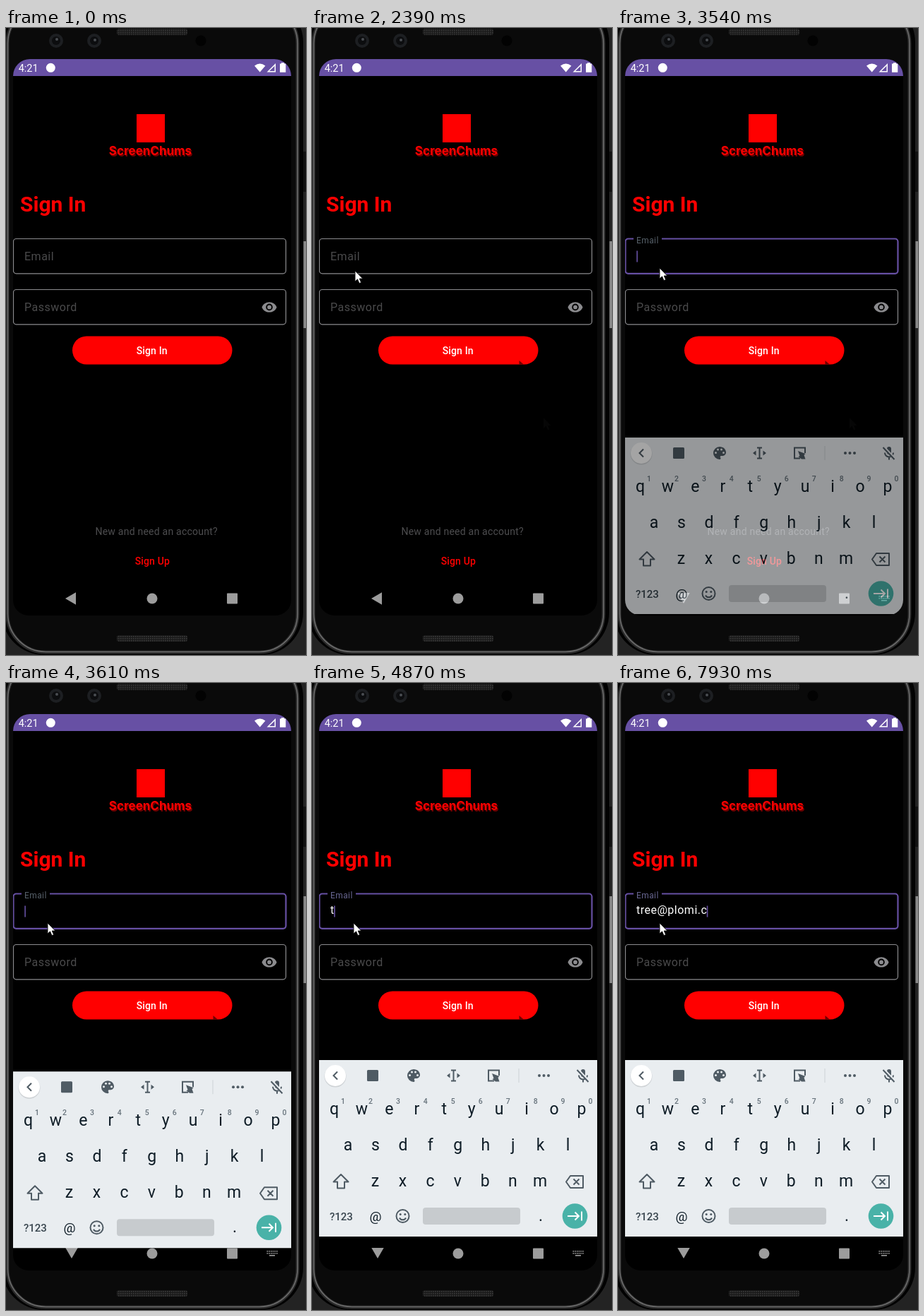
An HTML page that plays this animation: 425 by 888 pixels, repeating every 8 s.

```html
<!DOCTYPE html>
<html lang="en">
<head>
<meta charset="utf-8">
<title>Sign in</title>
<style>
  html, body { margin: 0; width: 100%; height: 100%; overflow: hidden; background: #000; }
  svg { display: block; width: 100%; height: 100%; }
  text { font-family: Roboto, sans-serif; white-space: pre; }
  .mid { text-anchor: middle; }
  .field { fill: none; stroke: #8b8b8e; stroke-width: 1.2; }
  .hint { font-size: 16px; letter-spacing: .5px; fill: #4a4a4b; }
  .icon { fill: #4f5b64; }
  .line { fill: none; stroke: #4f5b64; stroke-width: 2; }
  .key { font-size: 23px; fill: #0e1c26; text-anchor: middle; }
  .digit { font-size: 10.5px; fill: #66727b; text-anchor: middle; font-weight: 500; }
</style>
</head>
<body>
<svg viewBox="0 0 425 888" preserveAspectRatio="none">
  <defs>
    <clipPath id="screen"><path d="M10 68a24 24 0 0 1 24-24H380a24 24 0 0 1 24 24V810a22 22 0 0 1-22 22H32a22 22 0 0 1-22-22z"/></clipPath>
    <pattern id="mesh" width="3" height="3" patternUnits="userSpaceOnUse">
      <rect width="3" height="3" fill="#191919"/><rect width="1.6" height="1.6" fill="#3c3c3c"/>
    </pattern>
    <path id="arrow" d="M0 0V15L3.5 11.8 6 17.6 8.6 16.4 6.2 11H10.8z"/>
  </defs>

  <!-- phone body -->
  <rect width="425" height="888" fill="#232323"/>
  <rect x="421" y="175" width="4" height="57" fill="#101010"/>
  <rect x="421.500" y="302" width="3.500" height="123" fill="#8a8a8a"/>
  <rect x="-6" y="-40" width="427" height="928" rx="60" fill="#020202"/>
  <rect x="2" y="-32" width="411" height="916" rx="54" fill="#0a0a0a" stroke="#2a2a2a" stroke-width="5"/>
  <rect x="2.500" y="-32" width="410.500" height="915.500" rx="54" fill="none" stroke="#6c6c6c" stroke-width="1.600"/>
  <rect x="157" y="1" width="100" height="9" rx="3" fill="url(#mesh)"/>
  <rect x="157" y="860" width="100" height="9" rx="3" fill="url(#mesh)"/>
  <g id="lenses"></g>
  <circle cx="276" cy="18" r="7.500" fill="#020202"/>

  <g clip-path="url(#screen)">
    <rect x="10" y="44" width="394" height="788" fill="#000"/>
    <rect x="10" y="44" width="394" height="24" fill="#6750a4"/>
    <g fill="#fff">
      <text x="17.700" y="62" font-size="14.500">4:21</text>
      <circle cx="63.300" cy="56.300" r="6.500"/>
      <path d="M352 53.500Q359.700 47.500 367.400 53.500L359.700 62.500z"/>
      <path d="M382 50V62.500H369.500zM380.500 53.700L373 61H380.500z" fill-rule="evenodd"/>
      <path d="M390 50.500V49.300H394V50.500H396.300V62.800H388V50.500z"/>
    </g>

    <rect x="185" y="122" width="40" height="40" fill="#f00"/>
    <g class="mid" font-size="17" font-weight="700">
      <text x="206" y="181.500" fill="#700000" style="font-family:Inter,sans-serif">ScreenChums</text>
      <text x="204.500" y="180" fill="#f00" style="font-family:Inter,sans-serif">ScreenChums</text>
    </g>
    <text x="20" y="260" font-size="30" font-weight="700" fill="#f00">Sign In</text>

    <rect id="box" class="field" x="10.500" y="298.500" width="386" height="49.300" rx="4"/>
    <rect id="gap" x="22" y="296" width="0" height="5" fill="#000"/>
    <text id="label" class="hint">Email</text>
    <text id="typed" x="26" y="327" font-size="16" letter-spacing=".5" fill="#fff"></text>
    <rect id="caret" y="315.500" width="1.600" height="16" fill="#6750a4"/>

    <rect class="field" x="10.500" y="370.500" width="386" height="49.300" rx="4"/>
    <text class="hint" x="26" y="401">Password</text>
    <path transform="translate(361.500 383.900) scale(.96)" fill="#8b8b8e" d="M12 4.500C7 4.500 2.730 7.610 1 12c1.730 4.390 6 7.500 11 7.500s9.270-3.110 11-7.500c-1.730-4.390-6-7.500-11-7.500zM12 17a5 5 0 1 1 0-10 5 5 0 0 1 0 10zm0-8a3 3 0 1 0 0 6 3 3 0 0 0 0-6z"/>

    <rect x="94" y="436.500" width="226.500" height="40" rx="20" fill="#f00"/>
    <text x="184.700" y="462" font-size="14" font-weight="500" letter-spacing=".15" fill="#fff">Sign In</text>
    <g id="trail">
      <path d="M293.500 471L300.500 477H293.500z" fill="#700000"/>
      <use href="#arrow" x="328" y="552" fill="#060606"/>
    </g>
    <text x="126.500" y="717.500" font-size="14" letter-spacing=".23" fill="#4d4d4f">New and need an account?</text>
    <text x="182.700" y="760" font-size="14" font-weight="500" letter-spacing=".15" fill="#f00">Sign Up</text>

    <g fill="#9c9c9c">
      <path id="back" d="M-9 0L6-8.700V8.700z"/>
      <circle cx="207" cy="808" r="7.500"/>
      <rect x="313" y="800.500" width="15" height="15" rx="1"/>
      <g id="dots"></g>
    </g>

    <g id="board">
      <rect x="10" y="534" width="394" height="250" fill="#e9edf0"/>
      <circle cx="33" cy="557" r="15.500" fill="#cfd3d6"/>
      <circle cx="33" cy="556" r="15" fill="#fff"/>
      <path id="chevron" class="line" d="M3-5.500L-2.500 0 3 5.500"/>
      <g id="tools">
        <rect class="icon" x="78" y="548" width="16" height="16" rx="1.500"/>
        <path class="icon" transform="translate(132 544)" d="M12 3a9 9 0 0 0 0 18c.83 0 1.500-.67 1.500-1.500 0-.39-.15-.74-.39-1-.23-.26-.38-.61-.38-1 0-.83.67-1.500 1.500-1.500H16c2.760 0 5-2.240 5-5 0-4.420-4.030-8-9-8z"/>
        <g fill="#e9edf0">
          <circle cx="138.500" cy="555.500" r="1.500"/><circle cx="141.500" cy="551" r="1.500"/>
          <circle cx="146.500" cy="551" r="1.500"/><circle cx="149.500" cy="555.500" r="1.500"/>
        </g>
        <path class="line" d="M197 548.500H204M200.500 548.500V563.500M197 563.500H204"/>
        <path class="icon" d="M191 556l4.500-3.500v7zM210 556l-4.500-3.500v7z"/>
        <path class="line" d="M258 563.500H250V548.500H265V556"/>
        <path class="icon" d="M255 553l10.500 4-2 1.800 2 5.700h-5.500l-4.500-3.500 2-1z"/>
        <path d="M293 546V566" stroke="#cdd2d6"/>
        <g class="icon"><circle cx="322" cy="556" r="2"/><circle cx="328.500" cy="556" r="2"/><circle cx="335" cy="556" r="2"/></g>
      </g>
      <text id="hintWord" class="mid" x="98" y="561" font-size="15" fill="#0e1c26"></text>
      <rect class="icon" x="381" y="547" width="6" height="11" rx="3"/>
      <path class="line" d="M378 555.500a6 6 0 0 0 12 0M384 561.500V565.500"/>
      <path d="M376 547L392 564" stroke="#e9edf0" stroke-width="4"/>
      <path class="line" d="M375.500 548L391.500 565"/>
      <g id="keys"></g>
      <path class="line" stroke-linejoin="round" d="M41 696L30.500 706.500H36V715.500H46V706.500H51.500z"/>
      <path class="line" stroke-linejoin="round" d="M360 706.500L366 698H384V715H366zM370.500 702.500l8 8m0-8l-8 8"/>
      <text x="25" y="760.500" font-size="15" font-weight="500" fill="#38454e">?123</text>
      <text class="key" x="90" y="762" style="font-size:19px">@</text>
      <circle class="line" cx="128.500" cy="755" r="9"/>
      <g class="icon"><circle cx="125.200" cy="752.500" r="1.500"/><circle cx="131.800" cy="752.500" r="1.500"/></g>
      <path class="line" d="M124 757.500a5 5 0 0 0 9 0"/>
      <rect x="157" y="743" width="138" height="24" rx="4" fill="#c7cbce"/>
      <text class="key" x="324" y="762">.</text>
      <circle cx="372.500" cy="755" r="17.800" fill="#49b2a8"/>
      <path d="M362 755H378M372.500 749.500L378 755 372.500 760.500M382 748.500V761.500" fill="none" stroke="#fff" stroke-width="2"/>
    </g>
  </g>
  <use id="pointer" href="#arrow" fill="#fff" stroke="#111" stroke-width=".9"/>
</svg>
<script>
const LOOP = 8000;
const FOCUS = 3140, CARET = 3350, SLIDE = 3480;
const WORD = "tree@plomi.c";
const STROKES = [4810, 4880, 5000, 5210, 6070, 6870, 7000, 7070, 7200, 7400, 7670, 7930];

const el = id => document.getElementById(id);
const set = (id, attrs) => { for (const k in attrs) el(id).setAttribute(k, attrs[k]); };
const show = (id, on) => set(id, { visibility: on ? "visible" : "hidden" });
const clamp = v => Math.max(0, Math.min(1, v));
const mix = (a, b, p) => a + (b - a) * p;
const bezier = (a, b, c, d, p) => {
  const q = 1 - p;
  return q * q * q * a + 3 * q * q * p * b + 3 * q * p * p * c + p * p * p * d;
};
// index of the current step, n steps spread evenly over start..end
const step = (t, start, end, n) => Math.floor(clamp((t - start) / (end - start)) * (n - 1) + 0.05);

function build() {
  el("lenses").innerHTML = [71, 125].map((x, i) =>
    `<circle cx="${x}" cy="18" r="10" fill="#1d1f22"/><circle cx="${x}" cy="18" r="6" fill="#0c0d0f"/>` +
    `<circle cx="${x + 1}" cy="${16 + i}" r="2" fill="#4a4d52"/>`).join("");

  let keys = "";
  [["qwertyuiop", 31.5, 611], ["asdfghjkl", 51, 662], ["zxcvbnm", 89.5, 713]].forEach(([row, x0, y], r) =>
    [...row].forEach((c, i) => {
      const x = x0 + i * 38.95;
      keys += `<text class="key" x="${x}" y="${y}">${c}</text>`;
      if (!r) keys += `<text class="digit" x="${x + 12.5}" y="595.5">${(i + 1) % 10}</text>`;
    }));
  el("keys").innerHTML = keys;

  let dots = '<rect x="373" y="810" width="8" height="1.6"/>';
  for (let i = 0; i < 12; i++)
    dots += `<rect x="${369.5 + (i % 6) * 2.7}" y="${804 + Math.floor(i / 6) * 3}" width="1.6" height="1.6"/>`;
  el("dots").innerHTML = dots;
}

function pointerAt(t) {
  if (t < 1570) {
    const p = step(t, 630, 1040, 7) / 6, e = 1 - (1 - p) ** 2;
    return [mix(400, 282, e ** 1.7), mix(831, 454, e)];
  }
  if (t < 2390) {
    const p = (step(t, 1570, 2320, 12) + 1) / 12;
    return [bezier(282, 240, 100, 60, p), bezier(454, 772, 640, 347, p)];
  }
  if (t < 2650) return [61, 344];
  const p = (step(t, 2650, 2790, 3) + 1) / 3;
  return [mix(61, 59, p), mix(344, 340, p)];
}

function draw(t) {
  const [px, py] = pointerAt(t);
  show("pointer", t >= 630);
  set("pointer", { x: px, y: py });
  show("trail", t >= 1040);

  // floating label and outline
  const f = clamp((t - FOCUS) / 167), lift = f * f * (3 - 2 * f), focused = t >= FOCUS;
  set("box", { style: focused ? "stroke:#6750a4;stroke-width:2.2" : "" });
  set("gap", { width: 40 * lift });
  set("label", {
    x: 26, y: mix(329, 305, lift),
    style: `font-size:${mix(16, 12, lift)}px;letter-spacing:${mix(.5, .4, lift)}px;` +
      `fill:${!focused ? "#4a4a4b" : t < 3810 ? "#566069" : "#676590"}`
  });

  // typing and caret
  const n = STROKES.filter(s => s <= t).length;
  const typed = WORD.slice(0, n);
  el("typed").textContent = typed;
  const since = t - (n ? STROKES[n - 1] : CARET);
  set("caret", { x: 26 + (n ? el("typed").getComputedTextLength() - 0.6 : 0.3) });
  show("caret", t >= CARET && since % 1000 < 460);

  // keyboard and navigation bar
  const k = clamp((t - SLIDE) / 190), nav = clamp((t - CARET) / 190);
  set("board", { opacity: Math.min(1, 2 * k), transform: `translate(0 ${77 * (1 - k) ** 1.33})` });
  set("back", { transform: `translate(93 ${mix(808, 806, nav)}) rotate(${-90 * nav})` });
  set("dots", { opacity: nav });

  const suggest = t >= 4880 && t < 6000;
  set("tools", { display: suggest ? "none" : "inline" });
  el("hintWord").textContent = suggest ? typed : "";
  set("chevron", { transform: `translate(33 556) scale(${suggest ? -1 : 1} 1)` });
}

function tick() {
  draw(performance.now() % LOOP);
  requestAnimationFrame(tick);
}

build();
tick();
</script>
</body>
</html>
```
